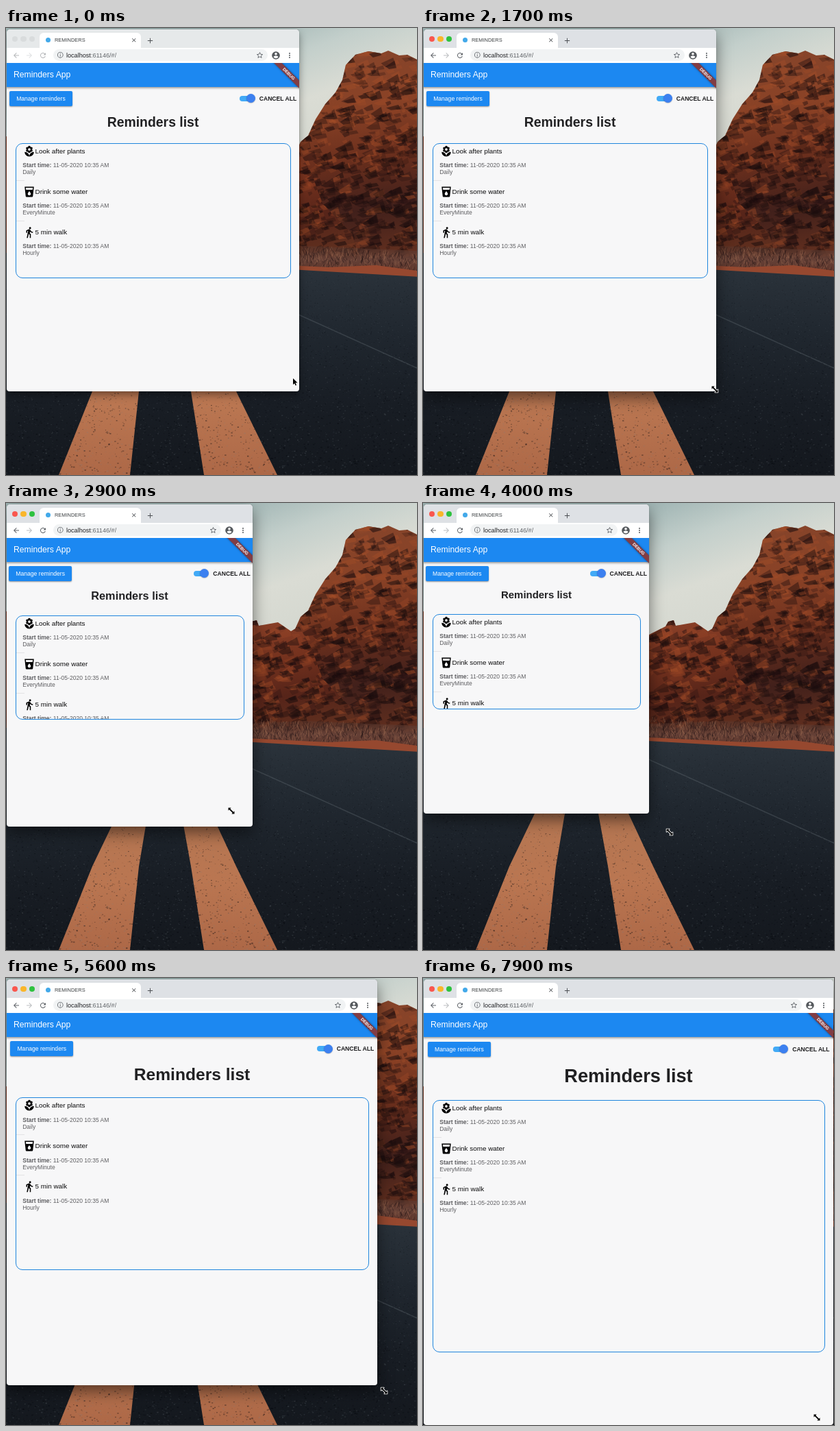
Recreate the animation shown at these times as an HTML page with a canvas. Size 600 by 652 pixels, loop 8 s.

```html
<!DOCTYPE html>
<html lang="en">
<head>
<meta charset="utf-8">
<title>Reminders</title>
<style>
html, body { margin: 0; width: 100%; height: 100%; overflow: hidden; }
body { position: relative; font-family: "Liberation Sans", Arial, sans-serif; background: #171c22; }
body *, canvas { position: absolute; box-sizing: border-box; }
svg * { position: static; }
canvas { left: 0; top: 0; }
.win { left: 1px; top: 2px; width: var(--w); height: calc(var(--h) - 2px); overflow: hidden;
  border-radius: 5px 5px 4px 4px; background: #f7f7f8; box-shadow: 0 9px 22px rgba(0,0,0,.5), 0 0 1px rgba(0,0,0,.5); }
/* page coordinates inside the window */
.in { left: -1px; top: -2px; width: calc(var(--w) + 1px); height: var(--h); }
.t { left: calc(var(--x) * 1px); top: calc(var(--y) * 1px - 10px); font-size: calc(var(--s) * 1px);
  line-height: 20px; white-space: pre; }
.t *, .row b { position: static; }
.tabs { left: 0; top: 0; width: 100%; height: 29px; background: #dee1e5; }
.light { top: 11.7px; width: 8.6px; height: 8.6px; border-radius: 50%; }
.tab { left: 49px; top: 7px; width: 148px; height: 22px; background: #fff; border-radius: 6px 6px 0 0; }
.tools { left: 0; top: 29px; width: 100%; height: 22px; background: #fff; }
.pill { left: 69px; right: 46px; top: 2px; height: 17px; border-radius: 9px; background: #f1f3f4; }
.mark { left: 58px; top: 14px; width: 7px; height: 7px; border-radius: 50%; background: #42a9ea; }
.bar { left: 0; top: 51px; width: 100%; height: 34.5px; background: #1c88f1; box-shadow: 0 1.5px 3px rgba(0,0,0,.42); }
.corner { right: 0; top: 51px; width: 40px; height: 40px; overflow: hidden; }
.ribbon { left: -5.5px; top: 11.7px; width: 60px; height: 7.6px; transform: rotate(45deg); background: #813d45;
  color: #fff; font: bold 6.2px/7.8px "Liberation Sans", Arial, sans-serif; text-align: center; box-shadow: 0 0 3px rgba(0,0,0,.5); }
.btn { left: calc(var(--w) * .0116); top: calc(90px + var(--w) * .0046); width: 92px; height: 22px; border-radius: 2px;
  background: #1c88f1; color: #fff; font-size: 8.6px; line-height: 22px; text-align: center; box-shadow: 0 1px 2px rgba(0,0,0,.4); }
.all { --r: calc(var(--w) * .009); right: var(--r); top: calc(101px + var(--w) * .0046); height: 0; }
.all * { white-space: nowrap; }
.all b { right: 0; top: -10px; font-size: 8.6px; line-height: 20px; color: #1b1b1d; }
.track { right: 63px; top: -4px; width: 20px; height: 8px; border-radius: 4px; background: #42aaf6; }
.thumb { right: 60.5px; top: -6.5px; width: 13px; height: 13px; border-radius: 50%; background: #3c80f0; box-shadow: 0 .5px 1.5px rgba(0,0,0,.35); }
.head { left: 0; width: calc(100% + 1px); top: calc(103px + var(--w) * .0335); height: 40px; line-height: 40px;
  text-align: center; font-weight: bold; font-size: calc(var(--w) * .0455); color: #212123; }
.box { left: 13.5px; right: 12.5px; top: calc(142.2px + var(--w) * .0595); bottom: var(--gap); overflow: hidden;
  border: 1.5px solid #1f85dd; border-radius: 10px; }
.row { left: 0; width: 100%; height: 59px; color: #5f5f62; }
.line { left: 0; top: 53px; width: 12px; height: 1px; background: #e3e3e5; }
.off .tabs { background: #e6e9ea; }
.off .light { background: #d9dcdd !important; }
.off .nav { opacity: .45; }
.off { box-shadow: 0 5px 12px rgba(0,0,0,.4), 0 0 1px rgba(0,0,0,.5); }
#cur { left: 0; top: 0; overflow: visible; width: 1px; height: 1px; }
#cur path { fill: #000; stroke: #fff; stroke-width: 1.6; paint-order: stroke; stroke-linejoin: round; }
</style>
</head>
<body>
<canvas id="photo" width="600" height="652"></canvas>
<div class="win" id="win"><div class="in" id="page">
  <div class="tabs">
    <div class="light" style="left:8.5px;background:#f9574f"></div>
    <div class="light" style="left:21px;background:#f9b62b"></div>
    <div class="light" style="left:33.5px;background:#2ec23f"></div>
    <div class="tab"></div><div class="mark"></div>
    <div class="t" style="--x:71;--y:18;--s:7.45;color:#3c4043">REMINDERS</div>
  </div>
  <div class="tools"><div class="pill"></div></div>
  <div class="t" style="--x:88;--y:39.5;--s:9.1;color:#63676b"><span style="color:#202124">localhost</span>:61146/#/</div>
  <div class="bar"></div>
  <div class="t" style="--x:11;--y:68;--s:12.2;color:#fff">Reminders App</div>
  <div class="corner"><div class="ribbon">DEBUG</div></div>
  <div class="btn">Manage reminders</div>
  <div class="all"><div class="track"></div><div class="thumb"></div><b>CANCEL ALL</b></div>
  <div class="head">Reminders list</div>
  <div class="box" id="box"></div>
</div></div>
<svg id="cur"><path/></svg>
<script>
const $ = id => document.getElementById(id);
const win = $('win'), page = $('page'), box = $('box'), cur = $('cur').firstChild;

// ---- icons (24 unit grid) ----
const circle = (x, y, r) => `M${x - r} ${y}a${r} ${r} 0 1 0 ${2 * r} 0a${r} ${r} 0 1 0 ${-2 * r} 0z`;
const petals = [[8.1, 5.75], [12, 3.5], [15.9, 5.75], [15.9, 10.25], [12, 12.5], [8.1, 10.25]];
const plant = `<path d="${petals.map(p => circle(...p, 2.5)).join('') + circle(12, 8, 4)}"/>
  <path fill="#f7f7f8" d="${circle(12, 8, 2.5)}"/>
  <path d="M12 22c5 0 9-4 9-9-5 0-9 4-9 9zM3 13c0 5 4 9 9 9 0-5-4-9-9-9z"/>`;
const drink = '<path d="M3 2l2 18.2C5.1 21.2 6 22 7 22h10c1 0 1.9-.8 2-1.8L21 2H3zm9 17c-1.7 0-3-1.3-3-3 0-2 3-5.4 3-5.4s3 3.4 3 5.4c0 1.7-1.3 3-3 3zm6.3-11H5.7l-.5-4h13.6l-.5 4z"/>';
const walk = `<path d="${circle(13.5, 3.5, 2)}M9.8 8.9L7 23h2.1l1.8-8 2.1 2v6h2v-7.5l-2.1-2 .6-3C14.8 12 16.8 13 19 13v-2c-1.9 0-3.5-1-4.3-2.4l-1-1.6c-.4-.6-1-1-1.7-1-.3 0-.5.1-.8.1L6 8.3V13h2V9.6z"/>`;
const arrow = '<path d="M20 11H7.8l5.6-5.6L12 4l-8 8 8 8 1.4-1.4L7.8 13H20z"/>';
const reload = '<path d="M17.6 6.4A8 8 0 1 0 19.7 14h-2.1A6 6 0 1 1 12 6c1.7 0 3.1.7 4.2 1.8L13 11h7V4z"/>';
const info = `<path fill-rule="evenodd" d="${circle(12, 12, 10)}${circle(12, 12, 8)}M11 7h2v2h-2zM11 11h2v6h-2z"/>`;
const star = '<path fill="none" stroke="#5f6368" stroke-width="2" d="M12 3.5l2.6 5.9 6.4.6-4.8 4.2 1.4 6.3-5.6-3.3-5.6 3.3 1.4-6.3L3 10l6.4-.6z"/>';
const user = `<path fill-rule="evenodd" d="${circle(12, 12, 10)}${circle(12, 8.2, 3.1)}M12 19.2a7 7 0 0 1-6-3.2c0-2 4-3.1 6-3.1s6 1.1 6 3.1a7 7 0 0 1-6 3.2z"/>`;
const dots = `<path d="${circle(12, 6, 2) + circle(12, 12, 2) + circle(12, 18, 2)}"/>`;
const cross = '<path d="M5 6.4L6.4 5 12 10.6 17.6 5 19 6.4 13.4 12 19 17.6 17.6 19 12 13.4 6.4 19 5 17.6 10.6 12z"/>';
const plus = '<path d="M11 4h2v7h7v2h-7v7h-2v-7H4v-2h7z"/>';

const icon = (shape, x, y, size, fill, extra = '') =>
  `<svg viewBox="0 0 24 24" width="${size}" height="${size}" fill="${fill}" style="left:${x < 0 ? `calc(100% - ${-x + size / 2}px)` : x - size / 2 + 'px'};top:${y - size / 2}px;${extra}" class="${y > 30 && x > 0 && x < 60 ? 'nav' : ''}">${shape}</svg>`;

page.insertAdjacentHTML('beforeend',
  icon(arrow, 14.5, 39.5, 12, '#5f6368') +
  icon(arrow, 34, 39.5, 12, '#bcbec1', 'transform:scaleX(-1)') +
  icon(reload, 54, 39.5, 12, '#5f6368') +
  icon(info, 79, 39.5, 10.5, '#5f6368') +
  icon(cross, 187, 18, 9.5, '#4a4d51') +
  icon(plus, 210, 18, 11, '#4a4d51') +
  icon(star, -58, 39.5, 11, '#5f6368') +
  icon(user, -33.6, 39.5, 14, '#55595d') +
  icon(dots, -14, 39.5, 12, '#55595d'));

const items = [[plant, 'Look after plants', 'Daily'], [drink, 'Drink some water', 'EveryMinute'], [walk, '5 min walk', 'Hourly']];
box.innerHTML = items.map(([shape, name, rate], i) => `<div class="row" style="top:${59 * i}px">
  ${icon(shape, 19, 11, 18, '#000')}
  <div class="t" style="--x:28;--y:11;--s:9.9;color:#0c0c0d">${name}</div>
  <div class="t" style="--x:9.7;--y:31.5;--s:8.55"><b>Start time:</b> 11-05-2020 10:35 AM</div>
  <div class="t" style="--x:9.7;--y:41.5;--s:8.55">${rate}</div>
  ${i < 2 ? '<div class="line"></div>' : ''}</div>`).join('');

// ---- desert road behind the window ----
function paintPhoto() {
  const g = $('photo').getContext('2d');
  let seed = 7;
  const rnd = (a = 1, b = 0) => (seed = (seed * 16807) % 2147483647, b + (a - b) * seed / 2147483647);
  const poly = pts => { g.beginPath(); pts.forEach(([x, y]) => g.lineTo(x, y)); g.closePath(); };
  const fade = (x0, y0, x1, y1, ...cols) => {
    const f = g.createLinearGradient(x0, y0, x1, y1);
    cols.forEach((c, i) => f.addColorStop(i / (cols.length - 1), c));
    return f;
  };
  const fill = (pts, style) => { poly(pts); g.fillStyle = style; g.fill(); };
  const roadY = x => 328 + x * .058;

  g.fillStyle = fade(330, 0, 400, 190, '#9fb4b3', '#c3cfcb', '#dadcd4', '#d5d8d0');
  g.fillRect(0, 0, 600, 652);

  const rocks = (pts, base, n, area) => {
    g.save();
    fill(pts, base);
    g.clip();
    const [x0, y0, x1, y1] = area;
    for (let i = 0; i < n; i++) {
      const x = rnd(x1, x0), y = rnd(y1, y0), l = rnd(20, 4);
      const dark = rnd() < .58 + .25 * (y - y0) / (y1 - y0);
      g.fillStyle = dark ? `rgba(25,12,13,${rnd(.55, .2)})` : `rgba(166,78,40,${rnd(.45, .15)})`;
      fill([[x, y], [x + l, y - l * rnd(.7, .1)], [x + l * 1.2, y + 2], [x + l * .4, y + rnd(6, 2)]], g.fillStyle);
    }
    g.restore();
  };
  rocks([[430, 166], [441, 157], [452, 133], [466, 111], [481, 94], [491, 76], [496, 54], [510, 39], [529, 34], [548, 37],
    [558, 33], [574, 40], [586, 39], [600, 46], [600, 360], [400, 350], [408, 215]],
    fade(490, 40, 540, 340, '#86442a', '#8a4226', '#6b2f1d', '#41201b', '#64301f'), 900, [400, 30, 600, 345]);
  rocks([[0, 158], [250, 200], [330, 192], [354, 180], [358, 173], [366, 171], [369, 179], [397, 174], [416, 187], [428, 180],
    [446, 212], [462, 256], [505, 300], [520, 350], [0, 342]],
    fade(350, 175, 380, 345, '#8a4028', '#75321e', '#562419', '#60301f'), 520, [320, 168, 520, 345]);

  // dry brush and sand beside the road
  fill([[0, 318], [330, 322], [440, 318], [600, 325], [600, 363], [0, 330]], fade(0, 315, 0, 360, 'rgba(88,56,46,.3)', '#654036', '#5b3329'));
  for (let i = 0; i < 650; i++) {
    const x = rnd(600, 320), y = rnd(roadY(x) - 2, roadY(x) - 30);
    g.strokeStyle = rnd() < .5 ? 'rgba(152,103,79,.45)' : 'rgba(38,22,22,.5)';
    g.beginPath(); g.moveTo(x, y); g.lineTo(x + rnd(4, -4), y - rnd(9, 3)); g.stroke();
  }
  fill([[330, 342], [470, 349], [540, 346], [600, 354], [600, 364], [330, 348]], '#96482f');

  fill([[0, roadY(0)], [600, roadY(600)], [600, 652], [0, 652]], fade(0, 345, 0, 652, '#2b333b', '#20272f', '#181d24', '#14181e'));
  g.strokeStyle = 'rgba(112,122,130,.3)';
  g.lineWidth = 1.4;
  g.beginPath(); g.moveTo(325, 372); g.lineTo(600, 496); g.stroke();

  const stripes = [
    [[163, 453], [207, 453], [194, 530], [181, 652], [77, 652], [126, 530]],
    [[256, 453], [300, 453], [336, 530], [396, 652], [289, 652], [270, 530]]];
  for (const s of stripes) fill(s, fade(0, 453, 0, 652, '#b47652', '#ba7651', '#ad6847'));

  // asphalt grain, coarser toward the viewer
  for (let i = 0; i < 7500; i++) {
    const x = rnd(600), y = rnd(652, 350);
    if (y < roadY(x) + 2) continue;
    const s = .5 + rnd(1.4) * (y - 330) / 320;
    g.fillStyle = rnd() < .5 ? `rgba(5,8,13,${rnd(.5, .15)})` : `rgba(120,128,136,${rnd(.25, .06)})`;
    g.fillRect(x, y, s * 1.4, s);
  }
}
paintPhoto();

// ---- motion ----
const size = [ // ms, right edge, bottom edge
  [0, 428, 530], [1750, 428, 530], [2200, 409, 514], [2900, 360, 472], [3500, 328, 451], [4000, 330, 453],
  [4500, 388, 495], [5000, 464, 546], [5600, 542, 594], [6000, 568, 622], [6500, 585, 644], [7000, 597, 652], [8000, 599, 652]];
const mouse = [
  [0, 419, 511], [600, 420, 515], [1000, 426, 527], [1700, 426, 527], [2200, 390, 498], [2900, 329, 449], [3400, 326, 447],
  [4000, 360, 480], [4500, 425, 523], [5000, 490, 564], [5600, 552, 602], [6000, 575, 626], [6500, 590, 646], [7000, 594, 648], [7900, 575, 641]];
const gaps = [[453, 153], [472, 157], [530, 166], [594, 169], [615, 169], [615.1, 111], [644, 109], [652, 107]];
const POINTER = 'M0 0v9.2l2.1-2 1.5 3.4 1.5-.7-1.5-3.3h3z';
const RESIZE = 'M-4.5-4.5H-.3L-1.7-3.1 3.1 1.7 4.5.3V4.5H.3L1.7 3.1-3.1-1.7-4.5-.3z';

function at(table, t) {
  if (t <= table[0][0]) return table[0].slice(1);
  const i = table.findIndex(r => r[0] > t);
  if (i < 0) return table[table.length - 1].slice(1);
  const a = table[i - 1], b = table[i], k = (t - a[0]) / (b[0] - a[0]);
  return a.slice(1).map((v, j) => v + (b[j + 1] - v) * k);
}

function draw() {
  const t = Math.floor(performance.now() % 8000 / 100) * 100;
  const [right, bottom] = at(size, t).map(Math.round);
  const [x, y] = at(mouse, t);
  win.style.setProperty('--w', right - 1 + 'px');
  win.style.setProperty('--h', bottom + 'px');
  win.style.setProperty('--gap', at(gaps, bottom)[0] - .5 + 'px');
  win.classList.toggle('off', t < 1300);
  cur.setAttribute('d', t < 1000 ? POINTER : RESIZE);
  cur.setAttribute('transform', `translate(${x} ${y})`);
  requestAnimationFrame(draw);
}
draw();
</script>
</body>
</html>
```
